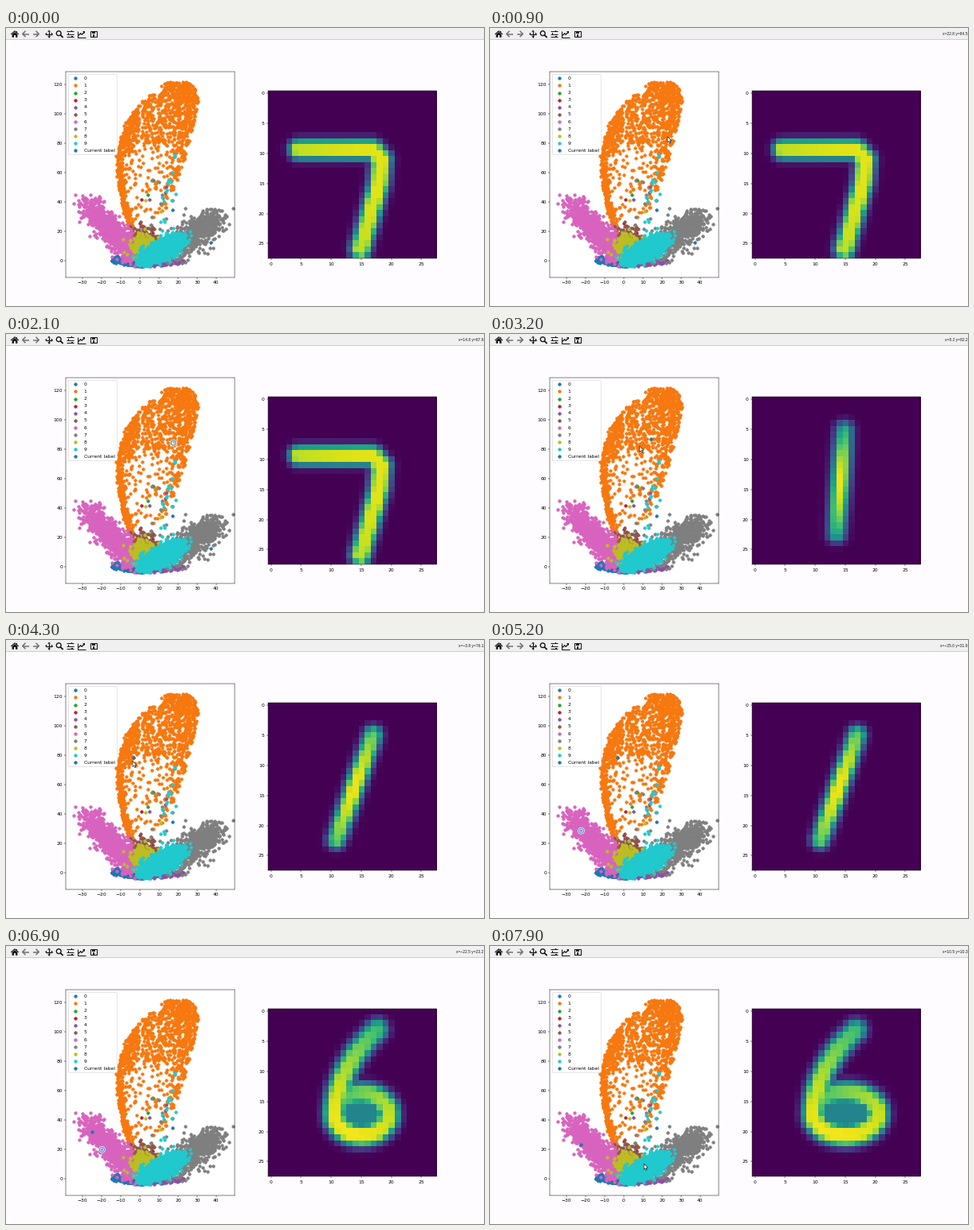
Animation of 600 by 350 pixels, one loop 8 s. Source, as a matplotlib script:

```python
import numpy as np
import matplotlib.pyplot as plt
from matplotlib.animation import FuncAnimation
from matplotlib.patches import Circle, Polygon, Rectangle

W, H, DPI = 600, 350, 100
STEP, FRAMES = 100, 80
SCALE = 0.435  # shrink of matplotlib's default sizes
X0, Y0, SX, SY = 168.0, 293.2, 2.4, 1.85  # data origin and pixels per unit

plt.rcParams.update({
    "toolbar": "None",
    "font.family": "DejaVu Sans",
    "font.size": 10 * SCALE,
    "axes.linewidth": 0.8 * SCALE,
    "lines.linewidth": 1.5 * SCALE,
    "lines.markersize": 6 * SCALE,
    "patch.linewidth": SCALE,
})
for axis in ("xtick", "ytick"):
    plt.rcParams.update({
        f"{axis}.major.size": 3.5 * SCALE,
        f"{axis}.major.width": 0.8 * SCALE,
        f"{axis}.major.pad": 3.5 * SCALE,
    })

rng = np.random.default_rng(7)
fig = plt.figure(figsize=(W / DPI, H / DPI), dpi=DPI, facecolor="#fefcfe")


def add_axes(left, top, right, bottom, **kw):
    return fig.add_axes([left / W, 1 - bottom / H, (right - left) / W,
                         (bottom - top) / H], **kw)


# ---- latent space, in data units ----------------------------------------

def streak(n, start, end, spread, a=1.0, b=1.0):
    """Points scattered around a segment; a and b shift the weight along it."""
    t = rng.beta(a, b, (n, 1))
    line = np.array(start) + t * (np.array(end) - start)
    return line + rng.normal(size=(n, 2)) * spread * np.array([1, 1.3])


def blob(n, center, spread):
    return streak(n, center, center, spread)


def wing():
    """Leaf with a dense left rim, a full top and a sparse middle."""
    def left(v):
        return -5 - 8 * np.sin(np.pi * v) + 20 * v ** 6

    def right(v):
        return -4 + 37 * v ** .45 - 9 * v ** 20

    def fill(v, w):
        return left(v) + w * (right(v) - left(v)), v

    rim = rng.uniform(0, .85, 420)
    parts = [
        (left(rim) + .8 + abs(rng.normal(size=420)) * (.8 + 4.2 * rim), rim),
        fill(1 - .5 * rng.beta(1.2, 2.0, 680), rng.beta(1.3, 1, 680)),
        fill(rng.uniform(.3, .75, 110), 1 - abs(rng.normal(0, .13, 110))),
        fill(rng.uniform(.12, .7, 130), rng.uniform(0, 1, 130)),
    ]
    x, v = np.hstack(parts)
    return np.column_stack([x, 15 + 107 * v])


def strays(n):
    return rng.uniform((0, 20), (18, 55), (n, 2))


classes = [
    ("#1f77b4", [streak(500, (-13.5, 1), (2, -2.3), .75), strays(1)]),
    ("#f6780f", [wing()]),
    ("#2ca02c", [blob(60, (1, 7), 3), strays(2)]),
    ("#b8222c", [blob(90, (3, 9), 3.5), strays(2)]),
    ("#8a4fa3", [streak(110, (0, -3), (23, 0), .6), strays(2)]),
    ("#8c564b", [blob(230, (2.5, 13), 3.6)]),
    ("#d863be", [streak(1000, (-30, 41), (-2, 3), 3.2, 1.7, 1.3)]),
    ("#7f7f7f", [streak(820, (42, 31), (13, 5), 3.7, 1.5, 1.5), strays(9)]),
    ("#bcbd22", [blob(230, (1, 10.5), 3), strays(2)]),
    ("#20c9ce", [streak(1300, (0, -.5), (22, 15), 2.3, 1.7, 1.5),
                 streak(16, (13, 22), (18, 72), 2)]),
]

ax = add_axes(75.2, 55.3, 286.8, 313.5)
for k, (color, parts) in enumerate(classes):
    p = np.vstack(parts)
    p = p[p[:, 1] > -4 + .004 * (p[:, 0] - 4) ** 2]
    ax.scatter(*p.T, color=color, label=str(k))
marker = ax.scatter([37], [12.4], color="#1f77a8", label="Current label")
ax.set_xlim((75.2 - X0) / SX, (286.8 - X0) / SX)
ax.set_ylim((Y0 - 313.5) / SY, (Y0 - 55.3) / SY)
ax.set_xticks(range(-30, 41, 10))
ax.set_yticks(range(0, 121, 20))
ax.legend(loc="upper left", labelspacing=.64)


# ---- decoded digits -----------------------------------------------------

def stroke(path, core, soft, low, high):
    """Soft pen on the 28 x 28 grid, strongest halfway along the path."""
    path = np.asarray(path, float)
    s = np.r_[0, np.cumsum(np.hypot(*np.diff(path, axis=0).T))]
    t = np.linspace(0, 1, 200)
    x, y = (np.interp(t * s[-1], s, c) for c in path.T)
    gy, gx = np.mgrid[:28, :28, :1][:2]
    d = np.hypot(gx - x, gy - y)
    ink = low + (high - low) * np.sin(np.pi * t)
    return (ink * np.exp(-(np.maximum(d - core, 0) / soft) ** 2)).max(-1)


def six(top, center, rx, ry):
    """A bent stem running into an elliptical loop."""
    t = np.linspace(0, 1, 40)[:, None]
    (cx, cy), end = center, np.array([center[0] - rx, center[1]])
    bend = np.array([end[0] + .4, 9.5])
    stem = (1 - t) ** 2 * np.array(top) + 2 * t * (1 - t) * bend + t ** 2 * end
    a = np.pi - 1.82 * np.pi * t
    loop = np.hstack([cx + rx * np.cos(a), cy + ry * np.sin(a)])
    pen = stroke(np.vstack([stem, loop]), .6, 1.3, .68, .98)
    inside = stroke([(cx - 2, cy), (cx + 2, cy)], 1.3, 1.2, .45, .45)
    return np.maximum(pen, inside)


seven = stroke([(4.6, 9.4), (16.8, 9.4), (18.3, 11), (17.9, 15), (14.8, 26)],
               .6, 1.15, .9, .96)
upright = stroke([(14.8, 5.2), (13.5, 22.4)], .2, 1.3, .62, .97)
slanted = stroke([(16.9, 5), (10.8, 22.4)], .45, 1.15, .75, .97)
narrow_six = six((17.6, 3.1), (15, 17.2), 4.5, 3.5)
wide_six = six((16.7, 3.2), (15, 17.1), 5.4, 3.6)

digit_ax = add_axes(328.8, 78.5, 540.3, 290.4)
digit = digit_ax.imshow(seven, cmap="viridis", vmin=0, vmax=1, aspect="auto")
digit_ax.set_xticks(range(0, 26, 5))
digit_ax.set_yticks(range(0, 26, 5))

# ---- toolbar ------------------------------------------------------------

ui = add_axes(0, 0, W, H, zorder=5)
ui.set_xlim(0, W)
ui.set_ylim(H, 0)
ui.axis("off")
DARK, DIM, BAR = "#151515", "#6e6e6e", "#f1f0f1"


def shape(points, color=DARK):
    ui.add_patch(Polygon(points, fc=color, ec="none"))


def rect(x, y, w, h, color=DARK):
    ui.add_patch(Rectangle((x, y), w, h, fc=color, ec="none"))


def line(points, width=1.0, color=DARK):
    ui.plot(*zip(*points), color=color, lw=width * .72, solid_capstyle="butt")


def history_icon(x, way):
    line([(x - 4 * way, 7.5), (x + 3.5 * way, 7.5)], 1.5, DIM)
    line([(x, 3.8), (x + 3.8 * way, 7.5), (x, 11.2)], 1.5, DIM)


def home_icon(x):
    line([(x - 4.8, 8), (x, 3.8), (x + 4.8, 8)], 1.1)
    shape([(x - 3.4, 8), (x, 5.1), (x + 3.4, 8), (x + 3.4, 11.8), (x - 3.4, 11.8)])
    rect(x - 1, 9.2, 2, 2.6, BAR)
    rect(x + 2.2, 4, 1.2, 2.4)


def move_icon(x, y=7.5):
    for k in range(4):
        c, s = np.cos(k * np.pi / 2), np.sin(k * np.pi / 2)
        turn = np.array([[c, s], [-s, c]])
        line([(x, y), (x + 4 * c, y + 4 * s)], 1.2)
        shape(np.array([(4.9, 0), (2.8, 1.9), (2.8, -1.9)]) @ turn + (x, y))


def zoom_icon(x):
    ui.add_patch(Circle((x - .8, 6.7), 2.9, fc="none", ec=DARK, lw=1.0))
    line([(x + 1.3, 8.8), (x + 4.6, 12)], 1.8)


def slider_icon(x):
    for k, knob in enumerate((1.7, -2.3, 2.2)):
        y = 4.2 + 3.3 * k
        line([(x - 4.5, y), (x + 4.5, y)])
        rect(x + knob - .8, y - 1.3, 1.6, 2.6)


def chart_icon(x):
    line([(x - 4.7, 3.5), (x - 4.7, 11.5), (x + 5, 11.5)])
    line([(x - 3.3, 9.3), (x - .9, 6.8), (x + .7, 8.3), (x + 4.1, 4.8)], 1.3)
    shape([(x + 1.8, 4), (x + 4.7, 4), (x + 4.7, 6.9)])


def save_icon(x):
    ui.add_patch(Rectangle((x - 3.7, 3.9), 7.4, 7.4, fc=BAR, ec=DARK, lw=.75))
    rect(x - 2.2, 4.3, 4, 2.2)
    rect(x - 1.4, 8.2, 2.8, 2.8)


rect(0, 0, W, 14, BAR)
rect(0, 14, W, 0.8, "#cfcecf")
home_icon(11)
history_icon(24.5, -1)
history_icon(37.5, 1)
move_icon(54)
zoom_icon(67)
slider_icon(80.8)
chart_icon(94.5)
save_icon(110)

readout = ui.text(599.3, 9.3, "", ha="right", va="baseline", color="#202020",
                  family="Liberation Sans", fontsize=5.05 * .72)

# ---- pointer ------------------------------------------------------------

POINTER = np.array([(0, 0), (0, 7.2), (1.7, 5.7), (2.8, 8.1), (4, 7.6),
                    (2.9, 5.2), (5.1, 5.1)])
pointer = ui.add_patch(Polygon(POINTER, fc="white", ec="#111111", lw=.45))
halo = ui.add_patch(Circle((0, 0), 3, fc="none", ec="white", lw=1.9))
ring = ui.add_patch(Circle((0, 0), 3, fc="none", ec="#2f9fd0", lw=.9))

# time, x, y of the pointer in data units; it rests at each picked point
ROUTE = np.array([
    (0, 30, 165), (900, 22.8, 84.5), (1800, 14.8, 87.6), (2750, 14.8, 87.6),
    (3200, 8.2, 82.2), (3700, -3.8, 76.1), (4500, -3.8, 76.1),
    (5200, -25, 31.9), (5700, -25, 31.9), (6000, -23.8, 26.5),
    (6400, -22.5, 23.2), (7200, -22.5, 23.2), (7900, 10.5, 10.3)])

# time the result appears, picked point, decoded digit
RESULTS = [(0, (37, 12.4), seven), (2400, (14.2, 87), upright),
           (4200, (-3.3, 78.4), slanted), (5700, (-25, 31.9), narrow_six),
           (7000, (-22.5, 23.2), wide_six)]
BUSY = 500


def update(i):
    t = i * STEP
    x, y = (np.interp(t, ROUTE[:, 0], ROUTE[:, k]) for k in (1, 2))
    px, py = X0 + SX * x, Y0 - SY * y
    _, spot, image = [r for r in RESULTS if r[0] <= t][-1]
    marker.set_offsets([spot])
    digit.set_data(image)

    busy = any(r[0] - BUSY <= t < r[0] for r in RESULTS[1:])
    pointer.set_xy(POINTER + (px, py))
    pointer.set_visible(not busy)
    for c in (halo, ring):
        c.center = (px + 6.5, py + 6)
        c.set_visible(busy)

    inside = 55.3 < py < 313.5
    text = f"x={x:.1f} y={y:.1f}".replace("-", "\u2212")
    readout.set_text(text if inside else "")
    return marker, digit, pointer, halo, ring, readout


anim = FuncAnimation(fig, update, frames=FRAMES, interval=STEP, repeat=True,
                     repeat_delay=0, blit=False)
plt.show()
```
